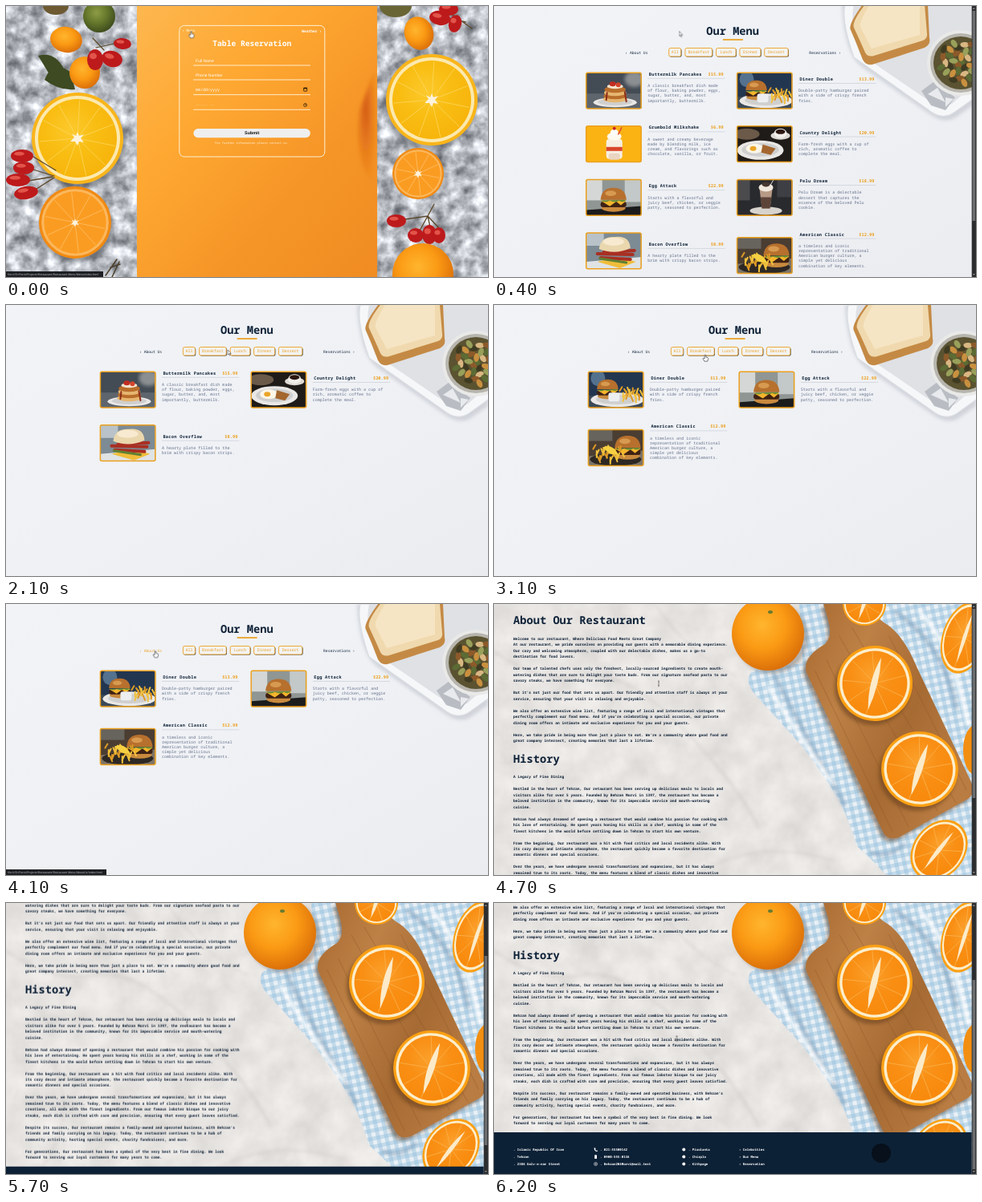
An HTML page that plays this animation: 600 px wide and 338 px high, repeating every 6300 ms.

```html
<!DOCTYPE html>
<html lang="en">
<head>
<meta charset="utf-8">
<title>Restaurant</title>
<style>
html, body { margin: 0; width: 100%; height: 100%; overflow: hidden; background: #eff1f5; }
svg { position: absolute; left: 0; top: 0; width: 100%; height: 100%; }
text { font-family: "Noto Sans Mono", "DejaVu Sans Mono", monospace; text-rendering: geometricPrecision; white-space: pre; }
.sans { font-family: "Liberation Sans", sans-serif; }
.ui { font-family: "Open Sans", sans-serif; }
</style>
</head>
<body>
<script>
const LOOP = 6300, STEP = 100;
const NAVY = '#0f2238', GOLD = '#eca01e', GREY = '#65718a';

// Drawing helpers
const f = n => +n.toFixed(2);
const svg = inner => {
  const el = document.createElementNS('http://www.w3.org/2000/svg', 'svg');
  el.setAttribute('viewBox', '0 0 600 338');
  el.innerHTML = inner;
  document.body.append(el);
  return el;
};
const E = (x, y, rx, ry, fill, rot = 0, more = '') =>
  `<ellipse cx="${x}" cy="${y}" rx="${rx}" ry="${ry}" fill="${fill}" transform="rotate(${rot} ${x} ${y})" ${more}/>`;
const R = (x, y, w, h, fill, r = 0, more = '') =>
  `<rect x="${f(x)}" y="${f(y)}" width="${w}" height="${h}" rx="${r}" fill="${fill}" ${more}/>`;
const P = (d, fill, more = '') => `<path d="${d}" fill="${fill}" ${more}/>`;
const L = (d, color, w) => P(d, 'none', `stroke="${color}" stroke-width="${w}" stroke-linecap="round"`);
const G = (inner, attrs = '') => `<g ${attrs}>${inner}</g>`;
const T = (x, y, str, size, fill, weight = 400, more = '') =>
  `<text x="${f(x)}" y="${f(y + size * .33)}" font-size="${size}" fill="${fill}" font-weight="${weight}" ${more}>${str}</text>`;
const MID = 'text-anchor="middle"', END = 'text-anchor="end"';
const SOFT = 'filter="url(#soft)"';

// Citrus: rind, pith and flesh, then fine membranes
const disc = (rx, ry, n, rind, pith, flesh, vein) => {
  let lines = '';
  for (let i = 0; i < n; i++) {
    const a = i * 2 * Math.PI / n + .2;
    lines += `M0 0L${f(Math.cos(a) * rx * .83)} ${f(Math.sin(a) * ry * .83)}`;
  }
  return E(0, 0, rx, ry, rind) + E(0, 0, rx * .93, ry * .93, pith) + E(0, 0, rx * .86, ry * .86, flesh) + L(lines, vein, .8);
};
const star = P('M0-8L2-3L8-5L4 0L8 5L2 4L0 9L-3 4L-9 4L-4-1L-7-6L-2-3Z', '#fdf3dc');
const lemon = (x, y, r) => G(disc(r, r, 11, '#f9b51a', '#fce9ae', 'url(#pulp)', '#fbd75c') + star, `transform="translate(${x} ${y})"`);
const orange = (x, y, r) => G(disc(r, r, 10, '#f18a12', '#fbb75c', '#fb9c22', '#fdc069') + G(star, 'transform="scale(.6)"'), `transform="translate(${x} ${y})"`);
const half = (x, y, rx, ry, rot) => G(disc(rx, ry, 9, '#fba013', '#fdeecb', 'url(#flesh)', '#fbb04a') +
  P(`M0 ${-ry * .7}Q${rx * .14} 0 0 ${ry * .72}Q${-rx * .2} 0 0 ${-ry * .7}Z`, '#fcebc9'), `transform="translate(${x} ${y}) rotate(${rot})"`);
const hip = (x, y, rx, ry, rot = 0) => E(x, y, rx, ry, '#bd1a1c', rot) + E(x - rx * .25, y - ry * .35, rx * .45, ry * .3, '#e2544a', rot);
const round = (x, y, rx, ry, rot = 0) => E(x, y, rx, ry, 'url(#fruit)', rot);
const status = path => {
  const w = path.includes('About') ? 125 : 121;
  return R(0, 331, w, 7, '#1d1f22') + T(2, 334.5, `file:///D:/Front/Projects/Restaurant/Restaurant Menu/${path}/index.html`, 3.45, '#c9ccd0', 400, 'class="ui"');
};
const scrollbar = (h, id) => R(594.7, 0, 5.3, 338, '#2c2d2f') +
  P('M596 4L597.3 2L598.7 4ZM596 334L597.3 336L598.7 334Z', '#9a9a9a') + R(595.6, 6, 3.5, h, '#6d6e70', 0, `id="${id}"`);

const texture = (id, freq, seed, gain, r, g, b) =>
  `<filter id="${id}" x="0" y="0" width="1" height="1" color-interpolation-filters="sRGB">
  <feTurbulence type="fractalNoise" baseFrequency="${freq}" numOctaves="4" seed="${seed}"/>
  <feColorMatrix values="${gain} 0 0 0 ${r} ${gain} 0 0 0 ${g} ${gain} 0 0 0 ${b} 0 0 0 0 1"/></filter>`;
const radial = (id, ...stops) => `<radialGradient id="${id}" cx=".42" cy=".38" r=".65">${ramp(stops)}</radialGradient>`;
const linear = (id, x2, y2, ...stops) => `<linearGradient id="${id}" x2="${x2}" y2="${y2}">${ramp(stops)}</linearGradient>`;
const ramp = stops => stops.map((c, i) => `<stop offset="${f(i / (stops.length - 1))}" stop-color="${c}"/>`).join('');

svg(`<defs>
${texture('plaster', .06, 4, .9, .27, .285, .31)}
${texture('marble', .03, 9, .12, .845, .835, .825)}
${radial('fruit', '#ffb52e', '#fb9a14', '#d96d08')}
${radial('kiwi', '#8d9c45', '#66782c', '#3c4a1c')}
${radial('pulp', '#fcc92c', '#f9bd12', '#f7b40c')}
${radial('flesh', '#fba02b', '#f98f14', '#f88a0c')}
${radial('glow', '#c94a0ccc', '#e4701400')}
${linear('cloth', 1, 1, '#fdb74f', '#fea832', '#f59527', '#f08c22')}
${linear('wood', 1, .6, '#a9692f', '#bd8146', '#a66a33', '#b97c42')}
${linear('paper', 1, 1, '#f1f3f7', '#eff1f5', '#ebecf0')}
<filter id="soft"><feGaussianBlur stdDeviation="2"/></filter>
<pattern id="check" width="10" height="10" patternUnits="userSpaceOnUse" patternTransform="rotate(-12)">
${R(0, 0, 10, 10, '#e9f0f5')}${R(0, 0, 5, 10, '#8fbbdb', 0, 'opacity=".42"')}${R(0, 0, 10, 5, '#8fbbdb', 0, 'opacity=".42"')}</pattern>
<clipPath id="frame">${R(0, 0, 69, 45, '#000', 2)}</clipPath>
</defs>`);

// Table reservation page
const shade = (x, y, r) => E(x, y, r, r, '#5a606a88', 0, SOFT);
const field = (y, label, more) => T(236, y, label, 5, '#fff', 400, more) + L(`M233.5 ${y + 6}H378.5`, '#fff3dc', .9);
const booking = svg(
  R(0, 0, 600, 338, '#b9bec6', 0, 'filter="url(#plaster)"') +
  P('M48 92Q58 66 80 82L86 104Q66 106 48 92ZM40 62Q60 56 72 78L58 92Z', '#3d4a22') +
  E(62, 0, 16, 11, '#6d5a33') + round(75, 42, 20, 16, 10) + E(116, 13, 20, 20, 'url(#kiwi)') +
  L('M135 47L112 52M122 55L108 40', '#5d4a2a', 1.2) + hip(145, 47, 11, 7, 5) + round(98, 83, 19, 20) +
  hip(111, 67, 10, 13) + hip(132, 66, 13, 10, 15) + shade(92, 171, 57) + lemon(89, 165, 57) +
  L('M34 188L62 205M34 204L60 212M28 218L58 213M35 230L60 214', '#5b4528', 1.3) +
  hip(20, 187, 14, 8) + hip(22, 202, 13, 8) + hip(15, 217, 15, 8) + hip(25, 233, 15, 8, -10) +
  shade(88, 275, 45) + orange(86, 270, 45) +
  L('M124 336L138 316M130 326L142 322M132 338L141 319', '#4c3f2b', 1.5) +
  E(485, 0, 20, 14, '#6a6535') + round(514, 34, 18, 21, -20) +
  L('M552 8L580 28M545 14L572 20', '#5d4a2a', 1.3) + hip(540, 15, 13, 9, 10) + hip(551, 4, 12, 8) + hip(559, 22, 8, 11, 15) +
  shade(527, 123, 57) + lemon(530, 117, 57) + orange(513, 209, 32) +
  L('M497 266L525 262L538 276M525 262L515 280M525 262L528 276M525 262L533 247', '#5b4528', 1.3) +
  hip(486, 268, 12, 8) + hip(510, 286, 10, 9) + hip(527, 285, 9, 12) + hip(539, 286, 8, 10) + round(519, 334, 38, 38) +
  R(163, 0, 299, 338, 'url(#cloth)') + P('M462 70V230Q430 190 440 130Z', 'url(#glow)', SOFT) +
  R(215.8, 24.4, 181, 163.6, 'none', 6, 'stroke="#fff0d4" stroke-width="1"') +
  T(219, 31, '‹ Menu', 4.5, '#ffe2b0', 700) + T(393, 31, 'Weather ›', 4.6, '#fff', 700, END) +
  T(306.3, 46.8, 'Table Reservation', 9.6, '#fff', 700, MID) +
  field(68, 'Full Name', 'class="sans"') + field(86, 'Phone Number', 'class="sans"') + field(104.6, 'mm/dd/yyyy') +
  T(236, 123.5, '--:-- --', 5, '#ffd797') + L('M233.5 129.3H378.5', '#fff3dc', .9) +
  R(370.6, 102.2, 4, 4, 'none', .4, 'stroke="#2b1c08" stroke-width=".8"') + R(370.4, 101.8, 4.4, 1.5, '#2b1c08') +
  E(372.5, 123.5, 2, 2, 'none', 0, 'stroke="#2b1c08" stroke-width=".7"') + L('M372.5 122.3V123.6H373.5', '#2b1c08', .5) +
  R(233.4, 153, 145.4, 11.2, '#efefef', 5.6) + T(306.2, 158.5, 'Submit', 5.4, '#111', 700, MID + ' class="sans"') +
  T(306, 170.3, 'For further information please contact us.', 3.65, '#fff3dc', 400, MID) + status('Menu'));

// Menu page
const plate = (x, y, rx, ry) => E(x, y, rx, ry, '#e9e8e6') + E(x, y - .5, rx * .8, ry * .7, '#cfcfcf');
const fries = (x, y, w, h, n) => {
  let out = '';
  for (let i = 0; i < n; i++) {
    const a = x + (i * 7 % n) / n * w, b = y + (i * 5 % n) / n * h;
    out += L(`M${f(a)} ${f(b)}l${i % 3 * 3 - 3} ${5 + i % 4}`, i % 2 ? '#f3c23c' : '#dd9a26', 2);
  }
  return out;
};
const burger = (x, y, s) => G(E(0, 11, 13, 4, '#c98a3e') + R(-14, 4, 28, 6, '#3f2214', 3) + P('M-14 3L14 3L8 8L3 4L-4 9Z', '#f4b52c') +
  P('M-14 3Q-8 6-4 3Q2 6 6 3Q10 6 14 2Z', '#6d8f35') + P('M-14 2Q-13-11 0-11Q13-11 14 2Z', '#b7702d') + E(-3, -5, 6, 3, '#d79a50'),
  `transform="translate(${x} ${y}) scale(${s})"`);
const dishes = {
  pancakes: R(0, 0, 69, 45, '#434b55') + R(0, 26, 69, 19, '#5e656d') + E(60, 8, 12, 10, '#8b8f91', 0, SOFT) + plate(36, 37, 27, 6) +
    [33, 29, 25, 21].map((y, i) => E(36, y, 15 - i * .6, 4, i % 2 ? '#b96d2b' : '#e6b670')).join('') +
    E(36, 17, 10, 3, '#f3e4cd') + E(33, 14, 4, 3, '#c22d22') + E(40, 15, 3, 3, '#d4452c') + L('M48 24L50 36M26 25L25 34', '#8e2d18', 2),
  diner: R(0, 0, 69, 45, '#233650') + R(0, 30, 69, 15, '#3c4a58') + E(12, 8, 9, 10, '#54718d') + plate(36, 35, 33, 9) + fries(42, 19, 24, 12, 18) + burger(24, 20, .95) + R(25, 26, 14, 11, '#eceef0', 3),
  shake: R(0, 0, 69, 45, '#fbb314') + R(25, 16, 20, 25, '#f7efe2', 4) + R(25, 26, 20, 5, '#d9472c') + R(28, 34, 14, 8, '#e9d5c2', 3) +
    E(35, 13, 9, 5, '#fffaf0') + E(35, 8, 5, 4, '#fff') + E(35, 3, 2, 2, '#c3222a') + L('M40 10L44 2', '#e24d35', 1.6),
  country: R(0, 0, 69, 45, '#1f1b19') + E(12, 10, 16, 7, '#6b5a49') + plate(29, 30, 29, 12) + E(22, 28, 11, 6, '#fbf6e8') + E(20, 28, 4, 3, '#eba526') +
    P('M32 23L48 28L42 36L30 33Z', '#a4662f') + E(54, 12, 12, 5, '#ded9d3') + E(54, 9, 8, 6, '#f2efeb') + E(54, 7, 6, 3, '#2b1710'),
  egg: R(0, 0, 69, 45, '#8f9694') + R(0, 0, 20, 26, '#d4d7d5') + R(48, 0, 21, 28, '#c3c8c8') + P('M0 38L69 33V45H0Z', '#1c1b1c') + burger(34, 23, 1.15),
  dream: R(0, 0, 69, 45, '#292a2e') + R(0, 0, 16, 26, '#4b4b4d') + R(50, 0, 19, 22, '#3e3f45') + E(36, 39, 20, 5, '#d7d3cd') +
    P('M28 12H44L41 36H31Z', '#b69a86') + P('M29 22H43L41 36H31Z', '#5d4439') + E(36, 10, 9, 5, '#f1e8dd') + E(36, 6, 5, 3, '#463731') + L('M41 8L45 1', '#ddd', 1),
  bacon: R(0, 0, 69, 45, '#7d8b95') + R(0, 0, 22, 16, '#b8c2c8') + P('M0 36L69 30V45H0Z', '#dfe3e4') + P('M14 36L40 30L62 36L42 44Z', '#f0bd3a') +
    L('M14 26L58 27M18 31L55 33M22 24L60 22', '#a92f22', 4) + L('M17 32L50 37', '#5f8034', 3) + P('M16 20Q18 4 36 5Q54 3 55 19Q36 28 16 20Z', '#ead7ae') + E(34, 11, 13, 5, '#f7ead0'),
  classic: R(0, 0, 69, 45, '#4a3d32') + R(0, 0, 30, 14, '#67635d') + P('M0 33L69 26V45H0Z', '#7d7467') + E(34, 37, 32, 8, '#2d2824') + burger(49, 20, 1.15) + fries(9, 19, 34, 16, 24) + P('M18 22Q30 16 38 32L26 30Z', '#f6d042'),
};
const items = {
  pancakes: ['Buttermilk Pancakes', '$15.99', 'A classic breakfast dish made|of flour, baking powder, eggs,|sugar, butter, and, most|importantly, buttermilk.'],
  diner: ['Diner Double', '$13.99', 'Double-patty hamburger paired|with a side of crispy french|fries.'],
  shake: ['Grumbold Milkshake', '$6.99', 'A sweet and creamy beverage|made by blending milk, ice|cream, and flavorings such as|chocolate, vanilla, or fruit.'],
  country: ['Country Delight', '$20.99', 'Farm-fresh eggs with a cup of|rich, aromatic coffee to|complete the meal.'],
  egg: ['Egg Attack', '$22.99', 'Starts with a flavorful and|juicy beef, chicken, or veggie|patty, seasoned to perfection.'],
  dream: ['Pelu Dream', '$18.99', 'Pelu Dream is a delectable|dessert that captures the|essence of the beloved Pelu|cookie.'],
  bacon: ['Bacon Overflow', '$8.99', 'A hearty plate filled to the|brim with crispy bacon strips.'],
  classic: ['American Classic', '$12.99', 'a timeless and iconic|representation of traditional|American burger culture, a|simple yet delicious|combination of key elements.'],
};
const card = (key, i) => {
  const [name, price, body] = items[key], lines = body.split('|');
  const x = i % 2 ? 305.2 : 117.4, y = 83.2 + 66.6 * (i >> 1);
  const first = y + 16.3 + 6.15 * Math.max(0, 4 - lines.length), top = y + (lines.length > 4 ? 5.8 : 0);
  return G(G(dishes[key], 'clip-path="url(#frame)"') + R(0, 0, 68.4, 44.8, 'none', 2, `stroke="${GOLD}" stroke-width="1.5"`), `transform="translate(${x} ${f(top)})"`) +
    T(x + 78, first - 14.5, name, 5.3, NAVY, 700, 'letter-spacing=".3"') + T(x + 171, first - 14.5, price, 5.35, GOLD, 700, END) +
    L(`M${x + 77} ${f(first - 9.2)}h95.5`, '#c3c9d2', .6) +
    lines.map((s, k) => T(x + 76.5, first + 6.15 * k, s, 5.04, GREY)).join('');
};
const tabs = [['All', 220.4, 15], ['Breakfast', 240.6, 33.6], ['Lunch', 279.2, 24.6], ['Dinner', 308.6, 26], ['Dessert', 339.4, 29.4]];
const tab = ([name, x, w], hot) => R(x + .8, 53.2, w, 10.4, '#24364c', 2.2) +
  R(x, 52.5, w, 10.4, hot ? '#f9bf6c' : '#f3f3f4', 2, `stroke="${hot ? '#f3ab45' : GOLD}" stroke-width=".9"`) +
  T(x + w / 2, 57.8, name, 4.95, hot ? '#fde3b8' : GOLD, 400, MID);
const bits = ['#5c6b34', '#8d5a2a', '#c9903f', '#3f3b22', '#98a05a', '#d8b782'];
const salad = Array.from({ length: 34 }, (_, i) => {
  const a = i * 2.4, r = Math.sqrt(i / 34) * 27;
  return E(f(585 + Math.cos(a) * r), f(72 + Math.sin(a) * r), 5.5, 3.4, bits[i % 6], i * 47 % 180);
}).join('');
const lunchbox = P('M437 0Q440 62 462 78L548 138Q566 150 580 140L600 126V0Z', '#9aa0ab', 'opacity=".35" ' + SOFT) +
  P('M441 0Q436 20 452 66L544 131Q562 146 578 134L606 114V0Z', '#f6f7f9', 'stroke="#dadde2" stroke-width="1.2"') +
  P('M452 0Q446 30 460 62L548 122Q560 130 574 124L606 96V0Z', '#dfe1e5') +
  P('M463 0Q444 26 448 32Q456 50 463 69Q468 78 478 74L540 54Q548 50 546 42L544 0Z', '#c48a45') +
  P('M466 0Q449 22 452 29Q460 46 466 60Q469 66 477 64L538 45Q544 42 543 36L540 0Z', '#f0d9ae') +
  P('M472 0Q458 22 460 28L474 55L534 38V0Z', '#f6e5c4') +
  P('M536 108L552 96L578 116L566 132L548 126Z', '#b9bdc3') + P('M544 112L556 104L566 122ZM566 116L576 118L566 128Z', '#e8eaed') +
  E(585, 73, 42, 41, '#e9e9e8') + E(585, 73, 38, 37, '#b7b5ad') + E(585, 73, 34, 33, '#5a5230') + salad;
const menu = (keys, wide) => svg(R(0, 0, 600, 338, 'url(#paper)') + G(lunchbox, wide ? '' : 'transform="translate(-4 -2)"') +
  G(T(299.8, 31.8, 'Our Menu', 13.7, NAVY, 700, MID) + R(287.6, 41.2, 25, 1.7, GOLD) +
    T(166, 58, '‹ About Us', 4.7, NAVY, 500) + T(434.4, 58, 'Reservations ›', 4.7, NAVY, 500, END) +
    tabs.map(t => tab(t)).join('') + keys.map(card).join(''), wide ? '' : 'transform="translate(-2.66 0)"') +
  (wide ? '' : scrollbar(262, 'bar')));
const all = menu(Object.keys(items));
const morning = menu(['pancakes', 'country', 'bacon'], true);
const noon = menu(['diner', 'egg', 'classic'], true);
const hotAll = svg(G(tab(tabs[1], true), 'transform="translate(-2.66 0)"'));
const hotMorning = svg(tab(tabs[1], true));
const hotNoon = svg(tab(tabs[2], true));
const hotAbout = svg(R(165, 55, 30, 6, '#f0f2f6') + T(166, 58, '‹ About Us', 4.7, GOLD, 500) + status('AboutUs'));

// About page
const story = [`Welcome to our restaurant, Where Delicious Food Meets Great Company
At our restaurant, we pride ourselves on providing our guests with a memorable dining experience.
Our cozy and welcoming atmosphere, coupled with our delectable dishes, makes us a go-to
destination for food lovers.

Our team of talented chefs uses only the freshest, locally-sourced ingredients to create mouth-
watering dishes that are sure to delight your taste buds. From our signature seafood pasta to our
savory steaks, we have something for everyone.

But it's not just our food that sets us apart. Our friendly and attentive staff is always at your
service, ensuring that your visit is relaxing and enjoyable.

We also offer an extensive wine list, featuring a range of local and international vintages that
perfectly complement our food menu. And if you're celebrating a special occasion, our private
dining room offers an intimate and exclusive experience for you and your guests.

Here, we take pride in being more than just a place to eat. We're a community where good food and
great company intersect, creating memories that last a lifetime.`,
`A Legacy of Fine Dining

Nestled in the heart of Tehran, Our retaurant has been serving up delicious meals to locals and
visitors alike for over 5 years. Founded by Behzan Morvi in 1397, the restaurant has become a
beloved institution in the community, known for its impeccable service and mouth-watering
cuisine.

Behzan had always dreamed of opening a restaurant that would combine his passion for cooking with
his love of entertaining. He spent years honing his skills as a chef, working in some of the
finest kitchens in the world before settling down in Tehran to start his own venture.

From the beginning, Our restaurant was a hit with food critics and local residents alike. With
its cozy decor and intimate atmosphere, the restaurant quickly became a favorite destination for
romantic dinners and special occasions.

Over the years, we have undergone several transformations and expansions, but it has always
remained true to its roots. Today, the menu features a blend of classic dishes and innovative
creations, all made with the finest ingredients. From our famous lobster bisque to our juicy
steaks, each dish is crafted with care and precision, ensuring that every guest leaves satisfied.

Despite its success, Our restaurant remains a family-owned and operated business, with Behzan's
friends and family carrying on his legacy. Today, the restaurant continues to be a hub of
community activity, hosting special events, charity fundraisers, and more.

For generations, Our restaurant has been a symbol of the very best in fine dining. We look
forward to serving our loyal customers for many years to come.`];
const prose = (str, y) => str.split('\n').map((s, i) => T(24, y + 7.49 * i, s, 4.58, NAVY, 600)).join('');
const column = (x, lines) => lines.map((s, i) => T(x, 435.6 + 9 * i, s, 4.06, '#fff', 600)).join('');
const footer = R(0, 414, 594.7, 54, '#0d2136') +
  column(24, ['. Islamic Republic Of Iran', '. Tehran', '. 2386 Golv-e-nar Street']) +
  column(132, ['. 021-55500142', '. 0900-555-0136', '. Behzan204Morvi@mail.test']) +
  column(242, ['. Pixolanta', '. Chirplo', '. Kithpage']) + column(305, ['› Celebrities', '› Our Menu', '› Reservation']) +
  P('M124.6 433.6L126 433.2L126.6 435L126 435.6Q126.6 436.6 127.4 437L128 436.2L129 437L128.4 438Q124.6 438 124.6 433.6Z', '#fff') +
  R(125.2, 442.2, 2.8, 4.8, '#fff', .5) + E(126.6, 453.5, 2, 2, 'none', 0, 'stroke="#fff" stroke-width=".6"') + E(126.6, 453.5, .8, .8, '#fff') +
  [435.5, 444.5, 453.5].map(y => E(236.3, y, 2, 2, '#fff')).join('') + E(482, 440, 12, 12, '#07101b');
const board = 'M410 0C416 20 424 38 412 50C392 62 384 74 390 88L484 284Q490 296 504 291L590 243Q600 236 594 222L526 78Q510 40 490 26C476 18 474 10 470 0Z';
const about = svg(
  R(0, 0, 600, 338, '#e6e3e0', 0, 'filter="url(#marble)"') +
  G(L('M0 60Q60 100 110 90T230 150T330 280', '#b3adaa', 1.6) + L('M200 0Q240 60 300 90M250 338Q330 290 420 320M40 338Q90 270 60 200', '#b8b2ae', 1.4), SOFT + ' opacity=".5"') +
  P('M380 0H600V338H488Q470 318 452 302Q442 270 430 245Q410 212 384 178Q350 140 326 114Q308 94 324 82L384 74Z', 'url(#check)') +
  G(L('M350 90Q380 150 436 250M470 310Q490 318 510 300M500 10Q560 50 575 130', '#7f9db899', 5) + L('M342 104Q370 150 420 222M530 10Q570 50 590 150', '#fff', 4), SOFT) +
  E(346, 42, 45, 45, '#77706a77', 0, SOFT) + round(341, 37, 45, 46) + E(344, 10, 3, 2, '#6b7a2e') +
  P(board, '#5f3d2388', `transform="translate(-3 4)" ${SOFT}`) + P(board, 'url(#wood)') +
  L('M400 84L496 284M414 70L516 278M430 40L552 258M446 30L575 248M492 40L588 232', '#8f562855', 1.2) +
  half(461, 0, 27, 27, 20) + half(586, 42, 28, 46, 18) + E(601, 182, 17, 32, '#f28f12') +
  E(471, 104, 47, 47, '#6b421f99', 0, SOFT) + half(474, 99, 47, 47, 14) +
  E(527, 211, 48, 47, '#6b421f99', 0, SOFT) + half(530, 206, 48, 47, 18) + half(554, 307, 32, 41, 38) +
  G(T(24, 20.8, 'About Our Restaurant', 13.73, NAVY, 700) + prose(story[0], 43.3) +
    T(24, 193.6, 'History', 13.73, NAVY, 700) + prose(story[1], 215.6) + footer, 'id="page"') +
  scrollbar(236, 'thumb'));

// Pointer
svg(G(
  P('M-.8 .6Q0-.6.8.6V3L3 3.6Q3.8 4 3.6 5.6L2.8 8.2H-1L-2.9 5.2Q-2.8 3.8-1.5 4.6L-.8 5Z', '#fff', 'id="hand" stroke="#222" stroke-width=".6"') +
  P('M0 0V6L1.4 4.8L2.4 7L3.3 6.6L2.3 4.5H4.2Z', '#fff', 'id="arrow" stroke="#222" stroke-width=".5"') +
  P('M-1-3H1M0-3V3M-1 3H1', 'none', 'id="beam" stroke="#333" stroke-width=".6"'), 'id="cursor"'));

// Timeline
const $ = id => document.getElementById(id);
const play = (el, keys) => el.animate(keys, { duration: LOOP, iterations: Infinity });
// Holds full opacity inside the spans and none outside; one key per moment
const show = (el, ...spans) => {
  const keys = new Map([[0, 0]]);
  for (const [a, b] of spans) keys.set(a, 1).set(b, b < LOOP ? 0 : 1);
  if (!keys.has(LOOP)) keys.set(LOOP, 0);
  el.style.opacity = keys.get(0);
  play(el, [...keys].map(([t, opacity]) => ({ offset: t / LOOP, opacity, easing: 'step-end' })));
};
const move = (el, keys) => play(el, keys.map(([t, x, y], i) => ({
  offset: t / LOOP,
  transform: `translate(${x}px, ${y}px)`,
  easing: i + 1 < keys.length ? `steps(${(keys[i + 1][0] - t) / STEP})` : 'linear',
})));

show(booking, [0, 400]);
show(all, [400, 1500]);
show(morning, [1500, 2500]);
show(noon, [2500, 4400]);
show(about, [4400, LOOP]);
show(hotAll, [1100, 1500]);
show(hotMorning, [1500, 2000]);
show(hotNoon, [2200, 2900]);
show(hotAbout, [4000, 4400]);

show($('hand'), [0, 400], [1100, 2000], [2200, 3500], [4000, 4400]);
show($('arrow'), [400, 1100], [2000, 2200], [3500, 4000], [4400, 4700]);
show($('beam'), [4700, LOOP]);
move($('cursor'), [[0, 230.5, 31.5], [500, 230.5, 31.5], [1100, 258, 58], [1700, 258, 58], [2100, 276, 56], [2300, 290, 57],
  [2800, 290, 57], [3100, 263, 62], [4000, 186, 58.5], [4400, 186, 58.5], [5000, 224, 140], [5400, 224, 140], [6200, 227.5, 169], [LOOP, 227.5, 169]]);
move($('page'), [[0, 0, 0], [5300, 0, 0], [5900, 0, -128], [LOOP, 0, -128]]);
move($('thumb'), [[0, 0, 0], [5300, 0, 0], [5900, 0, 90], [LOOP, 0, 90]]);
</script>
</body>
</html>
```
